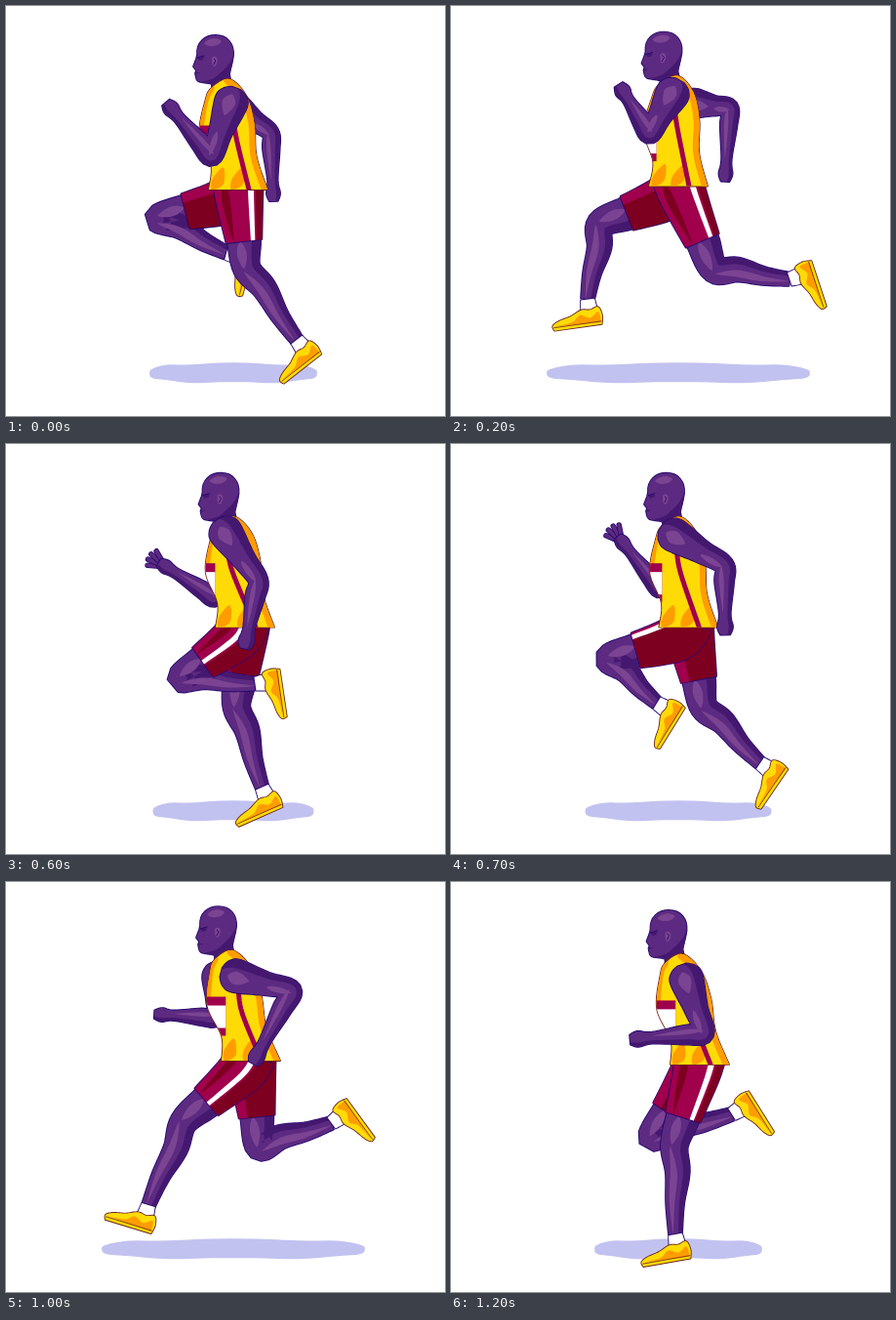
Animation of 450x420 px, one loop 1.3 s. Source, as an HTML page with a canvas:

```html
<!DOCTYPE html>
<html lang="en">
<head>
<meta charset="utf-8">
<title>Runner</title>
<style>
html, body { margin: 0; width: 100%; height: 100%; overflow: hidden; background: #fff; }
canvas { display: block; }
</style>
</head>
<body>
<canvas id="stage" width="450" height="420"></canvas>
<script>
const ctx = document.getElementById('stage').getContext('2d');
const SKIN = '#5c2a80', DARK = '#451870', LIGHT = '#7b4492', INK = '#24086e';
const YELLOW = '#ffdb05', ORANGE = '#ff9d00', SEAM = '#6b2420';
const MAROON = '#a0004c', WINE = '#7d0020';

// A stride takes 13 steps of 100 ms; far limbs run half a stride behind near ones.
const STEPS = 13, HALF = STEPS / 2;

// step, head x, hip x
const sway = [[0, 0, 238], [2, 3.5, 233], [4, -1.5, 240], [6, 5.5, 245],
  [9, 7, 240], [10, 3, 251], [12, 8.5, 255]];
// step, knee x y, ankle x y (from the waist), foot angle
const legCycle = [[0, 9, 82, 60, 155, 142], [2.25, 41, 87, 121, 89, 63], [3.75, 3, 90, 75, 60, 52],
  [5.5, -49, 76, 33, 52, 58], [6.5, -82, 31, -12, 66, 105], [8.5, -80, 40, -93, 117, 172],
  [10, -69, 64, -105, 149, 197], [12, -26, 84, -25, 175, 170]];
// step, elbow x y, hand x y (from the neck)
const armCycle = [[0, -6, 54, -48, 5], [2.25, -18, 32, -44, -11], [3.5, -5, 44, -60, 41],
  [4, 12, 33, -37, 73], [6, 36, 40, 24, 102], [6.5, 54, 30, 57, 92], [9, 68, 2, 62, 71],
  [10, 73, 16, 37, 84], [12, 34, 56, -34, 62], [12.5, -8, 58, -59, 26]];

const lerp = (a, b, t) => a.map((v, i) => v + (b[i] - v) * t);
const plus = (p, v, k = 1) => [p[0] + v[0] * k, p[1] + v[1] * k];
const unit = (a, b) => {
  const l = Math.hypot(b[0] - a[0], b[1] - a[1]) || 1;
  return [(b[0] - a[0]) / l, (b[1] - a[1]) / l];
};

// Value of a looping key list at a step
function track(keys, step) {
  const t = step % STEPS;
  const i = keys.findLastIndex(k => k[0] <= t);
  const a = keys[i], b = keys[i + 1] || [STEPS, ...keys[0].slice(1)];
  return lerp(a, b, (t - a[0]) / (b[0] - a[0])).slice(1);
}

// Catmull-Rom samples through points of any dimension
function curve(p, closed) {
  const n = p.length, out = [];
  const at = i => closed ? p[(i + n) % n] : p[Math.max(0, Math.min(n - 1, i))];
  for (let i = 0; i < (closed ? n : n - 1); i++) {
    const [a, b, c, d] = [at(i - 1), at(i), at(i + 1), at(i + 2)];
    for (let t = 0; t < 1; t += .125) {
      out.push(b.map((v, k) => v + .5 * t * (c[k] - a[k] + t * (2 * a[k] - 5 * v + 4 * c[k] - d[k]
        + t * (3 * (v - c[k]) + d[k] - a[k])))));
    }
  }
  if (!closed) out.push(p[n - 1]);
  return out;
}

function trace(points) {
  ctx.beginPath();
  points.forEach(([x, y]) => ctx.lineTo(x, y));
}

function shape(points, fill, line) {
  trace(points);
  ctx.closePath();
  if (line) {
    ctx.strokeStyle = line;
    ctx.lineWidth = 1.8;
    ctx.stroke();
  }
  ctx.fillStyle = fill;
  ctx.fill();
}

function stroke(points, color, width) {
  trace(points);
  ctx.strokeStyle = color;
  ctx.lineWidth = width;
  ctx.stroke();
}

// Ribbon along points [x, y, half width]; -1 is the front edge, 1 the back edge
function tube(p, fill, line, from = -1, to = 1, taper = false) {
  const c = curve(p), n = c.length - 1, mid = (from + to) / 2;
  const edge = side => c.map(([x, y, w], i) => {
    const [dx, dy] = unit(c[Math.max(i - 1, 0)], c[Math.min(i + 1, n)]);
    const s = taper ? mid + (side - mid) * Math.sin(Math.PI * i / n) : side;
    return [x + dy * w * s, y - dx * w * s];
  });
  shape([...edge(from), ...edge(to).reverse()], fill, line);
}

function flesh(p) {
  tube(p, SKIN, INK);
  tube(p, DARK, null, .45, 1);
}

function arm(step, neck, shoulder, size, open) {
  const [ex, ey, hx, hy] = track(armCycle, step);
  const elbow = plus(neck, [ex, ey]), hand = plus(neck, [hx, hy]);
  const wrist = lerp(hand, elbow, .22);
  const u = unit(shoulder, elbow), d = unit(wrist, hand);
  if (open) {
    for (let k = -1.5; k <= 1.5; k++) {
      const a = Math.atan2(d[1], d[0]) + k * .32;
      const tip = plus(hand, [Math.cos(a), Math.sin(a)], 20 - Math.abs(k));
      stroke([hand, tip], INK, 5.5);
      stroke([hand, tip], SKIN, 4);
    }
  }
  const mid = lerp(shoulder, elbow, .55), fore = lerp(elbow, wrist, .35);
  const at = (p, w) => [...p, w * size];
  flesh([at(plus(shoulder, u, -16), 5), at(plus(shoulder, u, -11), 13), at(shoulder, 17), at(mid, 12),
    at(elbow, 10), at(fore, 10), at(wrist, 6), at(hand, 8), at(plus(hand, d, 8), 5)]);
  tube([at(plus(shoulder, u, -9), 12), at(shoulder, 15), at(plus(shoulder, u, 14), 13)], LIGHT, null, -.6, .3, true);
  tube([at(mid, 11), at(elbow, 9)], LIGHT, null, -.6, 0, true);
  tube([at(elbow, 9), at(fore, 9), at(wrist, 6)], LIGHT, null, -.6, -.05, true);
}

// Shoe standing on a sole from heel to toe
function shoe(heel, d) {
  const at = ([u, v]) => [heel[0] + d[0] * u * 50 - d[1] * v, heel[1] + d[1] * u * 50 + d[0] * v];
  const top = [[0, 0], [-.03, 9], [.03, 18], [.2, 16], [.38, 17], [.62, 12], [.86, 9], [1, 5], [.98, 0]];
  shape(curve(top.map(at)), YELLOW, SEAM);
  shape(curve([[.01, 2], [.04, 13], [.22, 8], [.42, 12], [.6, 6], [.97, 4]].map(at)), ORANGE);
  stroke([[0, 3], [.98, 3]].map(at), SEAM, .8);
}

function leg(step, waist, near) {
  const [kx, ky, ax, ay, angle] = track(legCycle, step);
  const hip = plus(waist, [kx * .15, 12]), knee = plus(waist, [kx, ky]), ankle = plus(waist, [ax, ay]);
  const thigh = t => lerp(hip, knee, t), shin = t => lerp(knee, ankle, t);
  const back = unit(knee, ankle);
  const calf = plus(shin(.3), [back[1], -back[0]], 3);
  const lower = [[...knee, 14], [...calf, 12.5], [...shin(.65), 9.5], [...ankle, 7]];
  flesh([[...thigh(.45), 17], [...thigh(.62), 17], ...lower]);
  tube([[...thigh(.6), 16], [...thigh(.8), 14], [...knee, 12]], LIGHT, null, -.6, .1, true);
  tube(lower, LIGHT, null, -.65, 0, true);

  const a = angle * Math.PI / 180, d = [Math.cos(a), Math.sin(a)], up = [-d[1], d[0]];
  tube([[...ankle, 7], [...plus(ankle, up, -15), 9]], '#fff', INK);
  shoe(plus(plus(ankle, d, -11), up, -27), d);

  const shorts = [[waist[0], waist[1] - 6, 26], [...hip, 24], [...thigh(.6), 18.5]];
  tube(shorts, near ? MAROON : WINE, INK);
  if (near) {
    // the side seam turns forward as the thigh lifts
    const side = .5 - 3 * Math.max(0, .8 - ky / Math.hypot(kx, ky));
    tube(shorts, WINE, null, side + .2, 1);
    tube(shorts, WINE, null, -.75, -.4, true);
    tube(shorts, '#fff', null, side - .12, side + .12);
  } else {
    tube(shorts, MAROON, null, -1, -.5);
  }
}

function head(x, y) {
  const fill = (d, color) => {
    ctx.fillStyle = color;
    ctx.fill(new Path2D(d));
  };
  const face = new Path2D('M196 50C195 37 204 30 215 30C227 30 234 39 233 51C232 59 230 63 229 70L234 94'
    + 'L211 96L211 80C206 78 200 79 197 77C194 75 195 72 194 69L195 66L192 62L195 54Z');
  ctx.save();
  ctx.translate(x, y);
  ctx.strokeStyle = INK;
  ctx.lineWidth = 1.8;
  ctx.stroke(face);
  ctx.fillStyle = SKIN;
  ctx.fill(face);
  fill('M233 48C231 60 222 66 217 71C213 75 206 77 199 77L211 80L211 96L234 94L229 70C232 62 233 56 233 48Z', DARK);
  fill('M196 53L203 52L202 55L198 56ZM194 68L199 68L195 70Z', DARK);
  fill('M203 38C208 32 218 32 221 36C218 42 207 43 203 38ZM211 53C216 49 219 55 215 61C212 64 211 60 211 53Z', LIGHT);
  stroke([[213, 54], [215, 56], [213, 60]], INK, .9);
  stroke([[196, 53], [203, 51]], INK, 1);
  ctx.restore();
}

// Vest outline as [height along the spine, distance from it], from front hem to back hem
const cut = [[1, -30], [.78, -23], [.5, -29], [.2, -17], [.08, -8],
  [0, 12], [.15, 26], [.4, 29], [.7, 25], [1, 30]];

function vest(neckX, waist, bob, shoulder, twist) {
  const at = ([t, x]) => [neckX + (waist[0] - neckX) * t + x, 75 + bob + 113 * t];
  const p = cut.map(at), outline = curve(p);
  shape(outline, YELLOW, SEAM);
  ctx.save();
  trace(outline);
  ctx.closePath();
  ctx.clip();
  stroke(curve(p.slice(5)), ORANGE, 12);
  stroke(curve(p.slice(2, 5)), ORANGE, 6);
  for (const x of [-20, 0]) {
    shape(curve([[1, x - 7], [.9, x - 4], [.8, x + 9], [.95, x + 6]].map(at), true), ORANGE);
  }
  stroke(curve([plus(shoulder, [2, 12]), plus(shoulder, [6, 38]), at([1, 11])]), MAROON, 5);
  const [bx, by] = at([.42, -34]), width = 21 + 6 * twist;
  ctx.fillStyle = MAROON;
  ctx.fillRect(bx, by, width, 40);
  ctx.fillStyle = '#fff';
  ctx.fillRect(bx, by + 9, width, 23);
  ctx.restore();
}

function ground(width) {
  const round = (v, k) => Math.sign(v) * Math.abs(v) ** k;
  shape(Array.from({ length: 60 }, (_, i) => {
    const a = i * Math.PI / 30;
    return [233 + width / 2 * round(Math.cos(a), .8),
      376 + (10 + .8 * Math.sin(7 * a)) * round(Math.sin(a), .6)];
  }), '#c2c2f0');
}

function draw(step) {
  const wave = (peak, period = STEPS) => Math.cos(2 * Math.PI * (step - peak) / period);
  const [headX, hipX] = track(sway, step);
  const bob = 2.5 * (wave(0, HALF) - 1), twist = wave(11);
  const neck = [217 + headX, 100 + bob], waist = [hipX, 187 + bob];
  const nearShoulder = plus(neck, [9 + 8 * twist, 6 * twist - 4]);
  const farShoulder = plus(neck, [12 + 18 * wave(2.5), 3]);

  ctx.clearRect(0, 0, 450, 420);
  ctx.lineJoin = ctx.lineCap = 'round';
  ground(225 - 60 * wave(-.5, HALF));
  arm(step + HALF, neck, farShoulder, .88, step >= 6 && step <= 9);
  leg(step + HALF, waist, false);
  leg(step, waist, true);
  head(headX, bob);
  vest(neck[0], waist, bob, nearShoulder, twist);
  arm(step, neck, nearShoulder, 1, false);
}

function tick(now) {
  draw(Math.floor(now / 100) % STEPS);
  requestAnimationFrame(tick);
}
tick(0);
</script>
</body>
</html>
```
